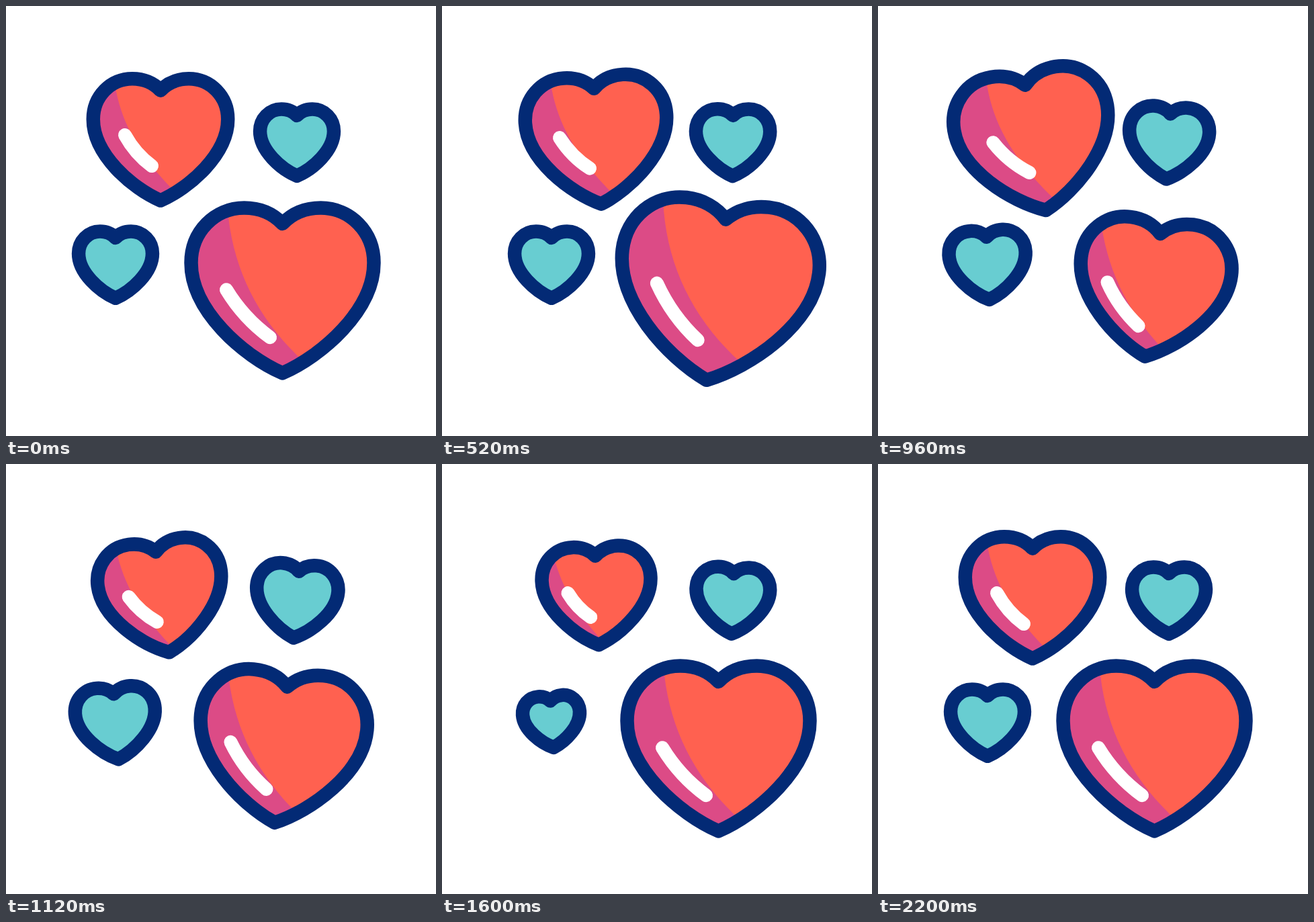
An HTML page for the animation above (2400 ms loop, 640x640 px).

```html
<!DOCTYPE html>
<html lang="en">
<head>
<meta charset="utf-8">
<title>Beating hearts</title>
<style>
  html, body { margin: 0; width: 100%; height: 100%; overflow: hidden; background: #fff; }
  svg { display: block; width: 640px; height: 640px; }
  path { vector-effect: non-scaling-stroke; }
  .red { fill: #ff6150; }
  .pink { fill: #dc4b86; }
  .teal { fill: #68cdd1; }
  .rim { fill: none; stroke: #032a75; stroke-width: 20.5; stroke-linejoin: round; }
  .shine { fill: none; stroke: #fff; stroke-width: 20; stroke-linecap: round; }
</style>
</head>
<body>
<svg id="stage" viewBox="0 0 640 640"></svg>
<script>
const LOOP = 2400, BEAT = 1600, PEAK = 700;
const HEART = 'M0-111.2C-14-126-34-134.7-57-134.7C-101-134.7-136-99-136-53' +
  'C-136 18-58 86 0 111.2C58 86 136 18 136-53C136-99 101-134.7 57-134.7C34-134.7 14-126 0-111.2Z';

// y: middle between notch and tip; lift: pivot height above it.
// shade is fixed on the stage, shine moves with the heart.
const hearts = [
  { x: 411.5, y: 435.2, lift: 27, size: 1, delay: 0, turn: 10, high: 1.15, low: 0.78,
    shade: 'M329 290C334 385 372 465 446 532L446 640H200V260H328Z',
    shine: 'M-83.5-13Q-58 29-18.5 58' },
  { x: 230, y: 207.6, lift: 24, size: 0.737, delay: 200, turn: -10, high: 1.24, low: 0.807,
    shade: 'M160 100C166 165 196 225 265 290L265 350H60V60H158Z',
    shine: 'M-71.9-21Q-51 17-17.6 41.4' },
  { x: 433, y: 208, lift: 12, size: 0.404, delay: 400, turn: 4.8, high: 1.13, low: 0.77 },
  { x: 163, y: 389.9, lift: 12, size: 0.404, delay: 600, turn: -6, high: 1.15, low: 0.773 }
];

const stage = document.getElementById('stage');

function add(parent, tag, attrs) {
  const el = document.createElementNS('http://www.w3.org/2000/svg', tag);
  for (const name in attrs) el.setAttribute(name, attrs[name]);
  return parent.appendChild(el);
}

hearts.forEach((h, i) => {
  const shape = (parent, cls, d = HEART) => add(parent, 'path', { class: cls, d });
  h.parts = [shape(stage, h.shade ? 'red' : 'teal')];
  if (h.shade) {
    const clip = add(stage, 'clipPath', { id: 'clip' + i });
    h.parts.push(shape(clip, ''));
    const masked = add(stage, 'g', { 'clip-path': `url(#clip${i})` });
    shape(masked, 'pink', h.shade);
    h.parts.push(shape(stage, 'shine', h.shine));
  }
  h.parts.push(shape(stage, 'rim'));
});

const mix = (a, b, u) => a + (b - a) * u;

function turnAt(t, h) {
  return h.turn * (t < PEAK ? (t / PEAK) ** 1.3 : (BEAT - t) / (BEAT - PEAK));
}

// Slow swell, sharp squeeze, then a second smaller beat.
function scaleAt(t, h) {
  if (t < PEAK) return mix(1, h.high, (t / PEAK) ** 2);
  if (t < 1000) return mix(h.high, h.low, (t - PEAK) / (1000 - PEAK));
  return mix(h.low, 1, 1 - Math.abs(1 - ((t - 1000) % 400) / 200));
}

function pose(h, time) {
  const t = time - h.delay;
  const active = t > 0 && t < BEAT;
  const turn = active ? turnAt(t, h) : 0;
  const scale = active ? scaleAt(t, h) : 1;
  const transform = `translate(${h.x} ${h.y - h.lift}) rotate(${turn}) scale(${scale}) ` +
    `translate(0 ${h.lift}) scale(${h.size})`;
  for (const part of h.parts) part.setAttribute('transform', transform);
}

const start = performance.now();

function draw() {
  const time = (performance.now() - start) % LOOP;
  for (const h of hearts) pose(h, time);
  requestAnimationFrame(draw);
}
draw();
</script>
</body>
</html>
```
